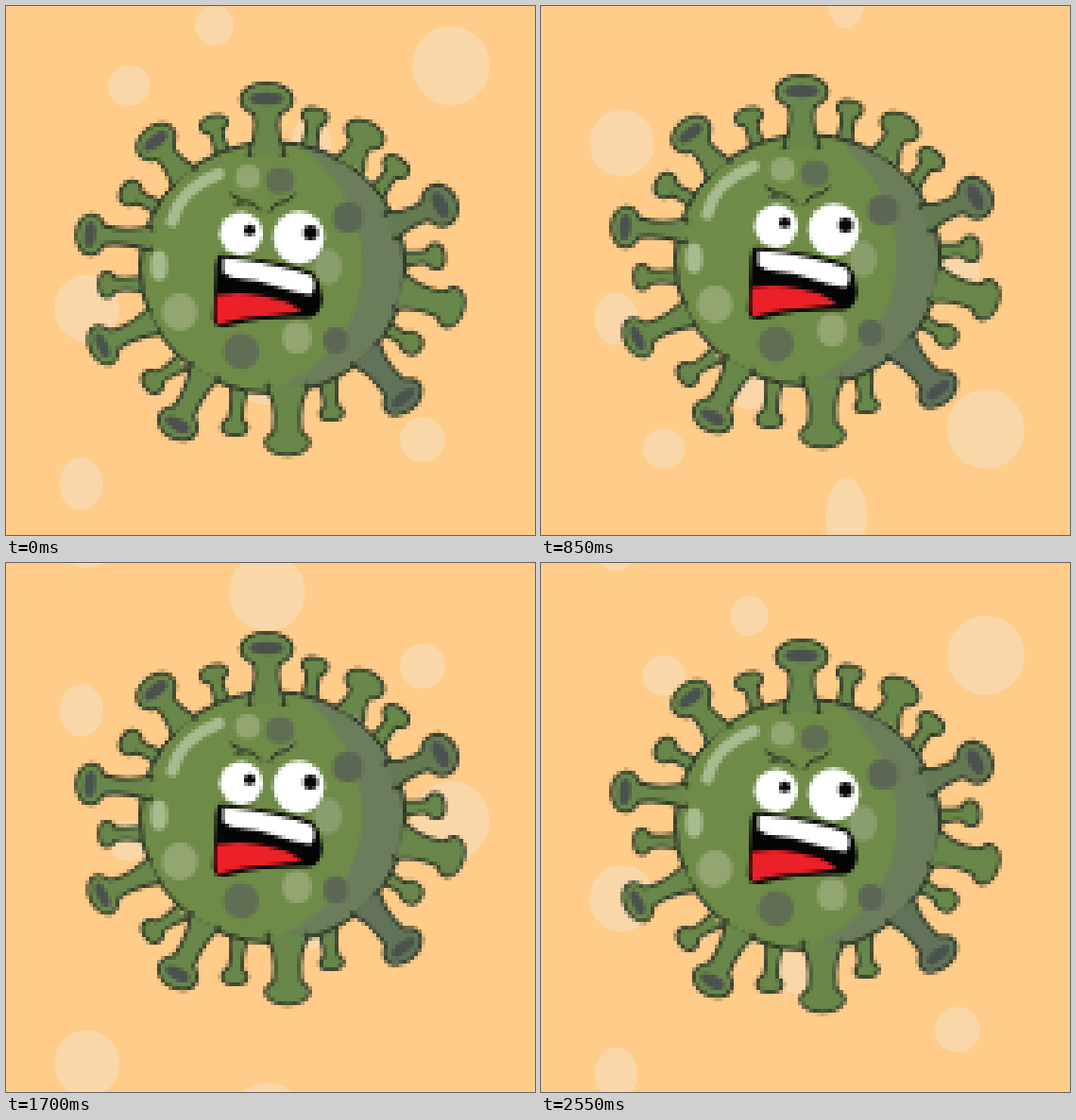
These frames come from a looping animation (560x560 px, 2.72 s). An HTML page with a canvas:

```html
<!DOCTYPE html>
<html lang="en">
<head>
<meta charset="utf-8">
<title>Angry virus</title>
<style>
  html, body { margin: 0; width: 100%; height: 100%; overflow: hidden; background: #ffcc8a; }
  svg, canvas { position: absolute; left: 0; top: 0; width: 560px; height: 560px; }
  canvas { image-rendering: pixelated; }
</style>
</head>
<body>
<svg id="bubbles" viewBox="0 0 560 560" fill="#fad7a8"></svg>
<canvas id="virus" width="140" height="140"></canvas>
<script>
const SIZE = 560, STEP = 170, STEPS = 16;
const GREEN = '#6f8b48', SPIKE = '#69874a', SHADE = '#6b7d5a';
const LINE = '#2d3728', DARK = '#4b514f', LIGHT = '#93a672', SPOT = '#606e54';

// cx, cy, rx, ry at time zero
const bubbles = [
  [471, 63, 41, 42], [220.5, 21, 20.5, 21], [130, 84, 22.5, 21.5], [85.5, 320, 34.5, 35.5],
  [79.5, 506, 23, 28], [441, 459, 24, 24], [323, 156.5, 22, 42.5], [276.5, 381, 40.5, 41]
];

// base x, y, head x, y, half width, half depth, stem width, color
const smallSpikes = [
  [229, 156, 220, 125, 13, 7, 9], [321, 152, 327, 117, 12, 7, 10],
  [394, 196, 413, 170, 13, 8, 10], [162, 214, 132, 198, 12, 9, 9],
  [146, 294, 107, 295, 12, 7, 9], [182, 380, 155, 398, 11, 8, 9],
  [247, 405, 242, 446, 12, 7, 10], [341, 400, 345, 431, 11, 6, 11],
  [404, 342, 429, 357, 10, 10, 9], [420, 268, 455, 265, 12, 8, 9]
];
const bigSpikes = [
  [276, 152, 276, 99, 26, 16, 21], [185, 177, 159, 144, 21, 15, 17],
  [148, 246, 90, 242, 20, 14, 13], [152, 336, 103, 359, 20, 13, 15],
  [208, 392, 182, 442, 20, 15, 18], [384, 372, 420, 414, 21, 14, 20, '#62735a'],
  [412, 231, 459, 211, 21, 17, 16, '#647a53']
];
const plainSpikes = [
  [298, 407, 298, 462, 22, 12, 24], [422, 304, 471, 319, 20, 12, 21], [366, 164, 380, 136, 20, 12, 18]
];

const g = document.getElementById('virus').getContext('2d');
g.scale(0.25, 0.25);
g.lineCap = g.lineJoin = 'round';

function oval(x, y, rx, ry, fill, turn = 0) {
  g.beginPath();
  g.ellipse(x, y, rx, ry, turn, 0, 7);
  g.fillStyle = fill;
  g.fill();
}

function shape(d, fill) {
  g.fillStyle = fill;
  g.fill(new Path2D(d));
}

function stroke(d, width, color) {
  g.lineWidth = width;
  g.strokeStyle = color;
  g.stroke(new Path2D(d));
}

function spike([bx, by, hx, hy, hw, hd, w, color = SPIKE], cup) {
  const dx = hx - bx, dy = hy - by, len = Math.hypot(dx, dy), r = w / 2;
  const stem = new Path2D(
    `M${-r * 1.7} 5Q${-r} ${-len * 0.2} ${-r} ${-len * 0.5}Q${-r} ${-len * 0.8} ${-hw * 0.7} ${-len}` +
    `H${hw * 0.7}Q${r} ${-len * 0.8} ${r} ${-len * 0.5}Q${r} ${-len * 0.2} ${r * 1.7} 5`);
  const head = new Path2D();
  head.ellipse(0, -len, hw, hd, 0, 0, 7);
  g.save();
  g.translate(bx, by);
  g.rotate(Math.atan2(dx, -dy));
  g.lineWidth = 6.5;
  g.strokeStyle = LINE;
  g.stroke(stem);
  g.stroke(head);
  g.fillStyle = color;
  g.fill(stem);
  g.fill(head);
  if (cup) oval(0, -len - 1, hw * 0.7, hd * 0.43, DARK);
  g.restore();
}

function drawBody() {
  const body = new Path2D();
  body.ellipse(282.5, 277, 140.5, 133, 0, 0, 7);
  g.save();
  g.clip(body);
  g.fillStyle = SHADE;
  g.fillRect(130, 130, 310, 300);
  shape('M286 130C342 162 377 215 377 272C377 340 335 395 255 414H130V130Z', GREEN);
  g.restore();
  g.lineWidth = 4;
  g.strokeStyle = LINE;
  g.stroke(body);
}

function drawSpots() {
  oval(256, 181, 13, 13, LIGHT);
  oval(184, 324, 19, 20, LIGHT);
  oval(308, 351, 15.5, 17, LIGHT);
  oval(341, 276, 15, 19, '#8a9d6c');
  oval(290, 185, 15, 14, SPOT);
  oval(249, 366, 19, 19, SPOT);
  oval(362, 224, 16, 16, '#5b6754');
  oval(349, 354, 13, 14, '#5b6754');
  stroke('M176 228Q184 193 225 178', 13, '#a8bb8f');
  oval(162, 275, 9, 16, '#a8bb8f');
}

function drawFace() {
  stroke('M239 200L249 206M244 209Q256 205 263 210L269 216', 3.5, LINE);
  stroke('M305 200Q299 209 291 208Q283 209 280 217', 3.5, LINE);
  oval(249, 241, 23, 23, '#fff');
  oval(310, 245, 27, 28, '#fff');
  oval(258, 237, 6, 6, '#080808');
  oval(322.5, 240, 8, 8, '#080808');
  shape('M227 263Q295 270 325 282Q334 291 335 309Q335 327 320 330Q270 329 236 339' +
        'Q220 343 219 331Q221 300 222 274Q223 264 227 263Z', '#050505');
  shape('M230 267Q292 273 324 286Q330 298 322 306Q305 304 280 295Q266 289 250 289' +
        'Q236 288 230 282Z', '#fff');
  shape('M223 306Q250 302 272 307Q300 311 313 323Q285 328 262 329Q243 331 225 337' +
        'Q221 336 223 306Z', '#ec2028');
}

smallSpikes.forEach(s => spike(s, false));
drawBody();
plainSpikes.forEach(s => spike(s, false));
bigSpikes.forEach(s => spike(s, true));
drawSpots();
drawFace();

// Each bubble has a twin one stage lower, so it wraps without a gap.
const field = document.getElementById('bubbles');
const dots = bubbles.flatMap(([cx, cy, rx, ry]) => [0, SIZE].map(shift => {
  const el = document.createElementNS('http://www.w3.org/2000/svg', 'ellipse');
  for (const [key, value] of Object.entries({ cx, rx, ry })) el.setAttribute(key, value);
  field.append(el);
  return { el, cy, ry, shift };
}));

function render(ms) {
  const step = Math.floor(ms / STEP) % STEPS;
  for (const { el, cy, ry, shift } of dots) {
    const y = (cy + ry - step * SIZE / STEPS + SIZE) % SIZE - ry;
    el.setAttribute('cy', y + shift);
  }
  const beat = step % 8;
  const rise = 4 * Math.min(beat, 7 - beat);
  g.canvas.style.transform = `translateY(${-rise}px)`;
}

const start = performance.now();
function tick() {
  render(performance.now() - start);
  requestAnimationFrame(tick);
}
tick();
</script>
</body>
</html>
```
